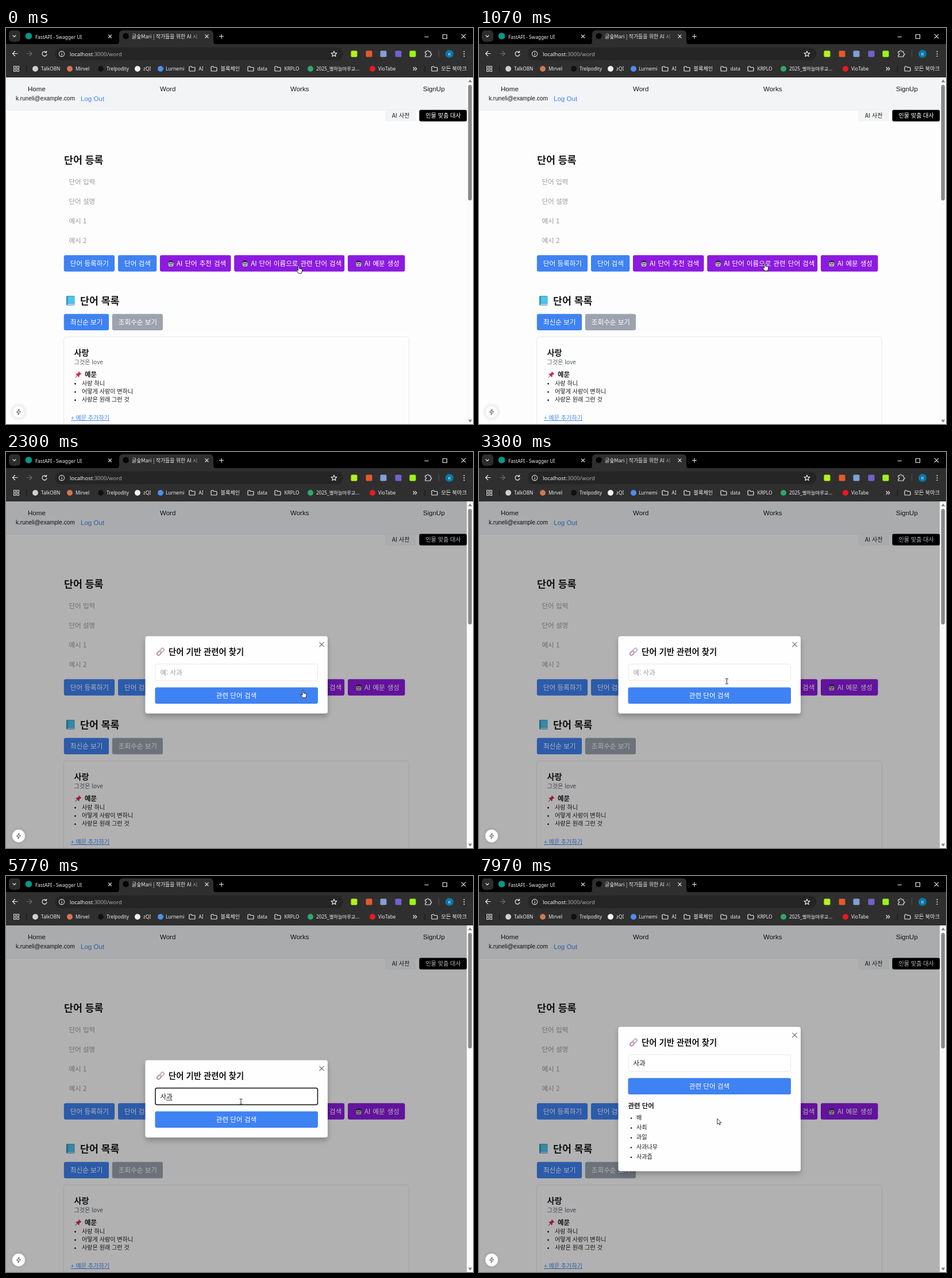
An HTML page for the animation above (8000 ms loop, 813 px wide and 689 px high).

```html
<!DOCTYPE html>
<html lang="ko">
<head>
<meta charset="utf-8">
<title>단어 등록</title>
<style>
  html, body { margin: 0; width: 100%; height: 100%; overflow: hidden; background: #fdfdfd; }
  svg { display: block; width: 813px; height: 689px; }
  text { font-family: "Noto Sans CJK KR", "Noto Sans", sans-serif; white-space: pre; }
  .ui { font-family: "Noto Sans", "Noto Sans CJK KR", sans-serif; }
  .arial { font-family: "Liberation Sans", Arial, sans-serif; }
  .bold { font-weight: 700; }
  .medium { font-weight: 500; }
  .wide { word-spacing: .06em; }
  .line { fill: none; stroke: #e8e8e8; stroke-width: 1.2; stroke-linecap: round; stroke-linejoin: round; }
</style>
</head>
<body>
<svg id="stage" viewBox="0 0 813 689">
  <defs>
    <linearGradient id="fade"><stop stop-color="#2f2f2f" stop-opacity="0"/><stop offset="1" stop-color="#2f2f2f"/></linearGradient>
    <filter id="soft" x="-20%" y="-20%" width="140%" height="150%">
      <feDropShadow dx="0" dy="5" stdDeviation="5" flood-opacity=".25"/>
    </filter>
    <g id="robot">
      <path d="M1 4.5Q1 0 5.5 0T10 4.5z" fill="#2f2d36"/>
      <rect y="4" width="11" height="4.5" rx="1.5" fill="#6a6570"/>
      <rect x="1.4" y="3.4" width="8.2" height="7.4" rx="2" fill="#c9c5cd"/>
      <path d="M2.8 5.6h2M6.2 5.6h2" stroke="#24222a" stroke-width="1.8"/>
      <path d="M3.5 8.8h4" stroke="#4a4650" stroke-width="1.3"/>
    </g>
    <g id="book">
      <rect width="14.5" height="16.5" rx="1.5" fill="#2a86bd"/>
      <path d="M2 14h12v1.4H2z" fill="#eef4f7"/>
      <path d="M3 .6H14v12.9H3z" fill="#52c3ea"/>
      <path d="M.8.6H3v12.9H.8z" fill="#2f9dcc"/>
    </g>
    <g id="pin">
      <path d="M4.5 7L.5 11" stroke="#8b929c" stroke-width="1.1"/>
      <path d="M7 0l4.5 4.5-1.2.7-.8-.2-2 2.3q.5 2-.6 3L1.300 4.700q1-1.100 3-.6l2.200-2-.3-1z" fill="#d9214e"/>
      <path d="M7 1l3.5 3.5" stroke="#f2647f"/>
    </g>
    <g id="chain" fill="none" stroke-width="1.9">
      <rect x="-4" y="-2.5" width="8" height="5" rx="2.5" transform="translate(4.5 9.5) rotate(-45)" stroke="#b28fae"/>
      <rect x="-4" y="-2.5" width="8" height="5" rx="2.5" transform="translate(9.5 4.5) rotate(-45)" stroke="#c9a9c4"/>
    </g>
    <path id="folder" class="line" d="M-5-3q0-1 1-1h2.5l1.5 1.5H4q1 0 1 1V3q0 1-1 1h-8q-1 0-1-1z"/>
  </defs>
  <g id="page"></g>
  <rect id="dim" y="86" width="802.5" height="603" fill="#000" opacity=".3"/>
  <g id="badge">
    <circle cx="22" cy="668" r="15" fill="#000" opacity=".035"/>
    <circle cx="22" cy="668" r="11" fill="#fff" stroke="#dcdcdc" stroke-width=".8"/>
    <path d="M22.9 663l-4.500 5.700h3.200l-.6 4.300 4.600-5.800h-3.200z" fill="none" stroke="#444" stroke-width=".9" stroke-linejoin="round"/>
  </g>
  <g id="modal"></g>
  <g id="chrome"></g>
  <g id="cursor">
    <path id="hand" fill="#fff" stroke="#111" stroke-width=".9" stroke-linejoin="round"
      d="M-1 .7c0-1.300 2-1.300 2 0V5l4 .9q1.300.3 1.200 1.600l-.5 3.200-1 2.600H-.2L-3.600 8.700q-.6-1.300.6-1.300L-1 8.700z"/>
    <path id="beam" fill="none" stroke="#222" d="M-2.500-4.500H-.5L0-4l.5-.5h2M0-4V4M-2.500 4.500H-.5L0 4l.5.5h2"/>
    <path id="arrow" fill="#fff" stroke="#222" stroke-width=".9" d="M0 0V10l2.300-2.100 1.600 3.300 1.500-.7-1.500-3.200H7z"/>
  </g>
</svg>
<script>
const $ = id => document.getElementById(id);
const text = (x, y, str, size = 11.55, fill = '#191919', attrs = '') =>
  `<text x="${x}" y="${y}" font-size="${size}" fill="${fill}" ${attrs}>${str}</text>`;
const rect = (x, y, w, h, fill, r = 0, attrs = '') =>
  `<rect x="${x}" y="${y}" width="${w}" height="${h}" rx="${r}" fill="${fill}" ${attrs}/>`;
const circle = (x, y, r, fill, attrs = '') => `<circle cx="${x}" cy="${y}" r="${r}" fill="${fill}" ${attrs}/>`;
const line = (d, color = '#e8e8e8') => `<path class="line" d="${d}" style="stroke:${color}"/>`;
const use = (id, x, y) => `<use href="#${id}" x="${x}" y="${y}"/>`;
const cross = (x, y, r, color) => line(`M${x - r} ${y - r}l${2 * r} ${2 * r}m0 ${-2 * r}l${-2 * r} ${2 * r}`, color);
const ui = (x, y, str, size = 8.3) => text(x, y, str, size, '#eee', 'class="ui"');
const BOLD = 'class="bold"', MEDIUM = 'class="medium"', ARIAL = 'class="arial"';
const BLUE = '#3f82f3', PURPLE = '#8c1ae0', GRAY = '#9ca3af', BAR = '#2f2f2f';

function browserBar() {
  const squares = [[606, '#b4f01a'], [632, '#e8572a'], [657, '#7f9fd6'], [683, '#6f62c8'], [708, '#9df01c']];
  const marks = [[51, '#d0d0d0', 61, 'TalkOBN'], [111, '#d9734f', 121, 'Mirvel'], [165, '#111', 175, 'Trelpodity'],
    [229, '#f4f4f4', 239, 'zQI'], [269, '#4f8df0', 278, 'Lurnemi'], [530, '#2fa866', 540, '2025_별하늘마루교...'],
    [638, '#f01822', 648, 'VioTabe']];
  const folders = [[324, 'AI'], [362, '블록체인'], [426, 'data'], [473, 'KRPLO'], [746, '모든 북마크']];
  return rect(0, 0, 813, 29, '#000') + rect(0, 28, 813, 58, BAR)
    + rect(5, 4, 20, 20, '#2d2d2d', 6) + line('M12 13l2.500 2.500 2.500-2.500')
    + circle(39.5, 14, 5.8, '#0a9788') + ui(51, 18.5, 'FastAPI - Swagger UI') + cross(181, 14.5, 2.6)
    + `<path d="M191 29q6 0 6-6V11q0-7 7-7H354q7 0 7 7V23q0 6 6 6z" fill="${BAR}"/>`
    + circle(208.5, 14, 5.3, '#000') + text(219, 18, '글숲Mari | 작가들을 위한 AI 시', 8.9, '#eee')
    + rect(322, 6, 18, 20, 'url(#fade)') + rect(340, 6, 4, 20, BAR) + cross(349.5, 14.5, 2.6)
    + line('M371.500 14.500h7m-3.500-3.500v7') + line('M729 15.500h6.500') + line('M760.500 11.500h7v7h-7z') + cross(796.5, 14.5, 3.4)
    + line('M20 44.500h-8.500m4-4l-4 4 4 4') + line('M36.500 44.500H45m-4-4l4 4-4 4', '#6c6c6c')
    + line('M70 42.200A4 4 0 1 0 71 45.500M70.500 40v2.700h-2.700')
    + rect(85, 34, 502, 22, '#252525', 11) + circle(97, 45, 4.6, 'none', 'stroke="#ddd" stroke-width="1.1"')
    + line('M97 44.800v2.200M97 42.800v.1')
    + text(111, 48.5, 'localhost<tspan fill="#a8a8a8">:3000/word</tspan>', 9.5, '#f2f2f2', 'class="ui"')
    + line('M571 40.200l1.400 3.200 3.400.3-2.600 2.300.8 3.400-3-1.800-3 1.800.8-3.400-2.600-2.300 3.400-.3z')
    + squares.map(([x, c]) => rect(x - 5.5, 39.5, 11, 11, c, 2)).join('')
    + line('M730 41h2.500q.2-2 1.700-2t1.700 2h3v3q2 .1 2 1.700t-2 1.700v2.600H730v-2.800q1.800-.2 1.800-1.600T730 44z')
    + line('M753.500 39v11', '#505050') + circle(772, 45, 7, '#0878a8')
    + text(772, 48, 'K', 7.5, '#fff', 'class="ui" text-anchor="middle"')
    + [41, 45, 49].map(y => circle(797.5, y, 1, '#eee')).join('')
    + [13.5, 19].map(x => [66.5, 72].map(y => rect(x, y, 3.5, 3.5, 'none', 0, 'stroke="#ddd"')).join('')).join('')
    + line('M35.500 66v10M728.500 66v10', '#181818')
    + marks.map(([x, c, tx, s]) => circle(x, 71, 5, c) + ui(tx, 74.2, s)).join('')
    + folders.map(([x, s]) => use('folder', x, 71) + ui(x + 11.5, 74.2, s, /[가-힣]/.test(s) ? 9.2 : 8.3)).join('')
    + line('M709 68.500l2.500 2.500-2.500 2.500m3.500-5l2.500 2.500-2.500 2.500');
}

function page() {
  const button = (x, y, w, fill, label, robot) => rect(x, y, w, 28.5, fill, 3)
    + (robot ? use('robot', x + 13.5, y + 9) : '')
    + text(x + (robot ? 29 : 11), y + 18.3, label, 11.6, '#fff', robot ? 'class="medium wide"' : MEDIUM);
  const items = ['사랑 하니', '어떻게 사랑이 변하니', '사랑은 원래 그런 것'];
  return rect(0, 86, 813, 603, '#fdfdfd') + rect(0, 86, 802.5, 57, '#f2f4f6') + rect(0, 142.5, 802.5, 1, '#e9ebee')
    + [[38, 'Home'], [268, 'Word'], [495, 'Works'], [726, 'SignUp']].map(([x, s]) => text(x, 109.5, s, 11.55, '#191919', ARIAL)).join('')
    + text(17, 126, 'k.runeli@example.com', 10.1, '#191919', ARIAL) + text(130, 126.7, 'Log Out', 11.55, BLUE, ARIAL)
    + rect(660, 143, 54, 19.5, '#f3f4f6', 3) + text(672, 156, 'AI 사전', 10.1)
    + rect(719.4, 142.5, 83, 20, '#000', 3) + text(730.5, 156, '인물 맞춤 대사', 10.1, '#fff', MEDIUM)
    + text(101, 236.3, '단어 등록', 17.3, '#191919', BOLD)
    + ['단어 입력', '단어 설명', '예시 1', '예시 2'].map((s, i) => text(109.5, 271.5 + 34 * i, s, 11.55, '#9b9ca1')).join('')
    + button(100.8, 395.2, 88.3, BLUE, '단어 등록하기') + button(195, 395.2, 67.3, BLUE, '단어 검색')
    + button(268, 395.2, 123.5, PURPLE, 'AI 단어 추천 검색', true)
    + button(397.2, 395.2, 192, PURPLE, 'AI 단어 이름으로 관련 단어 검색', true)
    + button(595, 395.2, 99.5, PURPLE, 'AI 예문 생성', true)
    + use('book', 105, 466) + text(129, 480.5, '단어 목록', 17.3, '#191919', BOLD)
    + button(100.8, 497.5, 78.3, BLUE, '최신순 보기') + button(184.8, 497.5, 88.2, GRAY, '조회수순 보기')
    + rect(100.5, 537.5, 601, 200, 'none', 4, 'stroke="#e5e7eb"')
    + text(118.5, 569.5, '사랑', 14.2, '#191919', BOLD) + text(118.5, 585, '그것은 love', 10.1, '#555b66')
    + use('pin', 120, 597.5) + text(137, 607.3, '예문', 11.4, '#191919', BOLD)
    + items.map((s, i) => circle(120.5, 619 + 14.3 * i, 1.4, '#191919') + text(132, 621.8 + 14.3 * i, s, 10.1)).join('')
    + text(113, 681.5, '+ 예문 추가하기', 10.1, BLUE, 'text-decoration="underline"');
}

const scrollbar = rect(802.5, 86, 10.5, 603, '#fbfbfb') + rect(804.5, 99, 6.5, 201, '#888', 3.2)
  + '<path d="M804.500 94.500h7l-3.500-5zM804.500 681.500h7l-3.500 5z" fill="#858585"/>';

// Syllables as they are composed in the word field.
const typing = [[4840, 'ㅅ'], [4970, '사'], [5100, '삭'], [5240, '사고'], [5270, '사과']];
const OPEN = 2300, FOCUS = 3470, BLUR = 6570, SEARCH = 6600, RESULT = 7900;

function modal(t) {
  const done = t >= RESULT, top = done ? 262.5 : 320.5;
  const focused = t >= FOCUS && t < BLUR;
  const word = typing.reduce((s, [at, w]) => t >= at ? w : s, '');
  const label = t >= SEARCH && !done ? '검색 중...' : '관련 단어 검색';
  let out = rect(242.5, top, 317.5, done ? 251 : 134.5, '#fefefe', 4, 'filter="url(#soft)"')
    + cross(549.5, top + 14.3, 3.7, '#777')
    + use('chain', 262, top + 20) + text(283, top + 32, '단어 기반 관련어 찾기', 14.4, '#191919', BOLD)
    + rect(260, top + 48.5, 282.5, 29, '#fff', 3, focused ? 'stroke="#111" stroke-width="1.5"' : 'stroke="#e7e8e9"')
    + text(268.5, top + 67.3, word || '예: 사과', 11.55, word ? '#191919' : '#9b9ca1')
    + rect(259.5, top + 89, 283.5, 28.5, BLUE, 3)
    + text(401, top + 107.4, label, 11.6, '#fff', 'class="medium" text-anchor="middle"');
  if (focused && word) out += rect(268.5 + 10.6 * (word.length - 1), top + 69, 10.4, 1, '#333');
  if (focused && !word && (t - FOCUS) % 1060 < 530) out += rect(268, 377, 1, 13.5, '#111');
  if (done) out += text(259.5, top + 141.3, '관련 단어', 11.4, '#191919', BOLD)
    + ['배', '사죄', '과일', '사과나무', '사과즙'].map((s, i) =>
      circle(265, top + 159 + 17 * i, 1.3, '#191919') + text(274, top + 161.8 + 17 * i, s, 10.1)).join('');
  return out;
}

const path = [[0, 509.5, 413.5], [40, 509.5, 413.5], [240, 506.5, 412], [500, 506.5, 412], [770, 440, 411], [970, 440, 411],
  [1140, 537, 408], [1400, 537, 408], [1540, 517, 414.5], [2900, 517, 414.5], [3040, 547, 412], [3200, 547, 412],
  [3300, 431.5, 399], [3500, 409, 392.5], [5800, 409, 392.5], [6570, 414.8, 422], [8000, 414.8, 422]];

function pointer(t) {
  const i = path.findIndex(p => p[0] > t), [t0, x0, y0] = path[i - 1], [t1, x1, y1] = path[i];
  const k = (t - t0) / (t1 - t0);
  return [x0 + (x1 - x0) * k, y0 + (y1 - y0) * k];
}

function cursorKind(t, x, y) {
  if (t < OPEN) return 'hand';
  if (t >= RESULT || x > 543) return 'arrow';
  return y < 400 ? 'beam' : y >= 409 ? 'hand' : 'arrow';
}

$('chrome').innerHTML = browserBar() + scrollbar;
$('page').innerHTML = page();

let shown = '';
function draw() {
  const t = performance.now() % 8000, open = t >= OPEN;
  const [x, y] = pointer(t), kind = cursorKind(t, x, y);
  const dialog = open ? modal(t) : '';
  if (dialog !== shown) $('modal').innerHTML = shown = dialog;
  $('dim').style.display = open ? '' : 'none';
  $('cursor').setAttribute('transform', `translate(${x} ${y})`);
  for (const id of ['hand', 'beam', 'arrow']) $(id).style.display = id === kind ? '' : 'none';
  requestAnimationFrame(draw);
}
draw();
</script>
</body>
</html>
```
